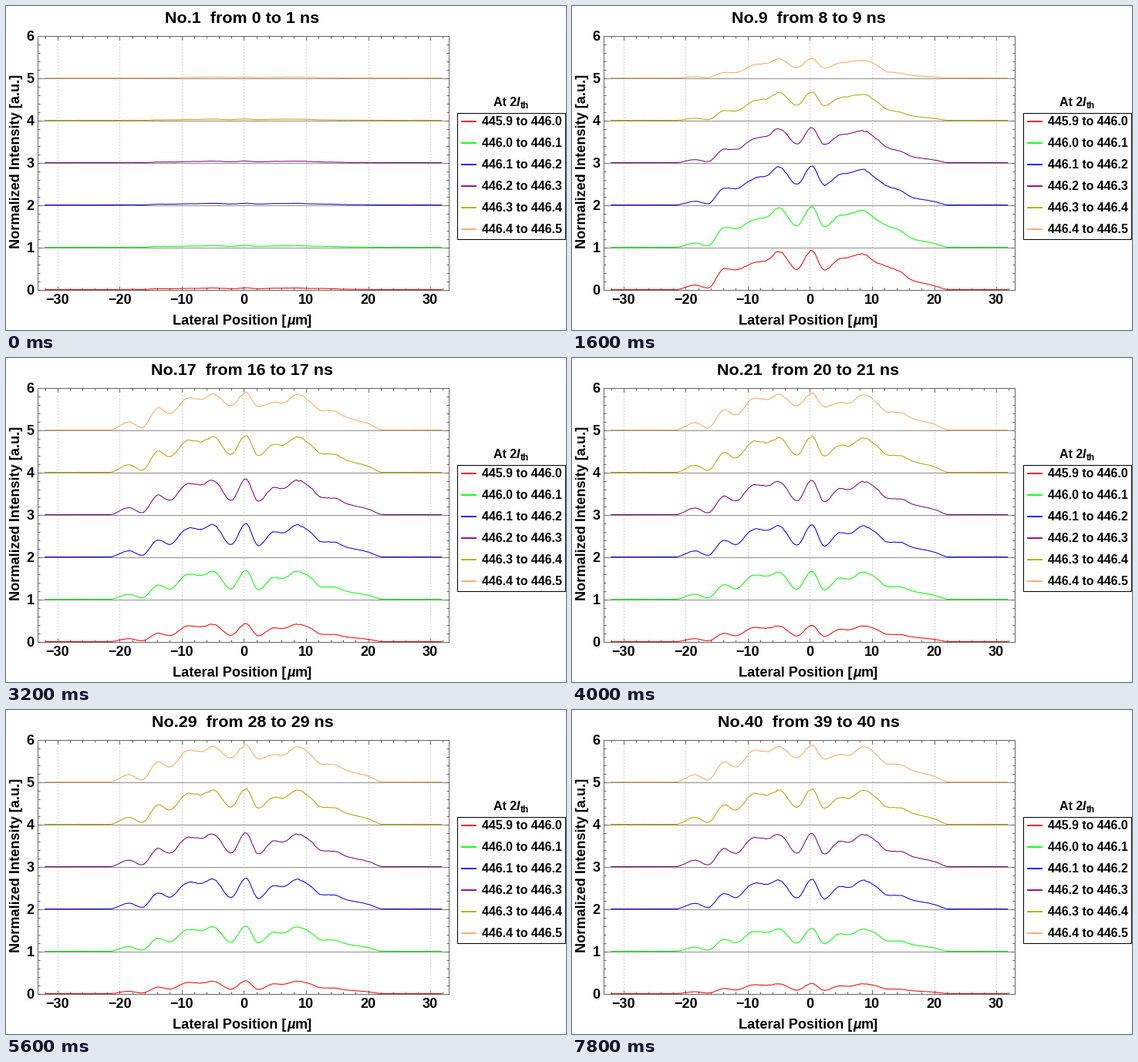
Animation, 726 px wide and 421 px high, one loop 8000 ms. Source, as a matplotlib script:

```python
import numpy as np
import matplotlib.pyplot as plt
from matplotlib.animation import FuncAnimation

W, H = 726, 421
LEFT, RIGHT, TOP, BOTTOM = 41.45, 574.45, 38.55, 368.55
X0, PX = 308.5, 8.055          # pixel of x = 0, pixels per micrometre
FRAMES, STEP = 40, 200

COLORS = ["#ff0000", "#00ff00", "#0000ff", "#800080", "#aaaa00", "#ffa858"]
BAND = np.arange(6)

# Peaks and dips of the beam profile: position, then relative height
# while switching on and in the steady state
KNOTS = np.array([-32, -21.6, -18.5, -16.4, -13.8, -12, -9, -7, -5, -2.1, 0.3,
                  2.3, 4.8, 6.3, 8.5, 10.5, 12.5, 14.5, 16.5, 20, 22.4, 32])
START = np.array([0, 0, .09, .03, .41, .39, .68, .74, .97, .52, 1,
                  .50, .78, .82, .91, .70, .45, .35, .18, .08, 0, 0])
STEADY = np.array([0, 0, .19, .05, .53, .38, .86, .82, .96, .35, 1,
                   .32, .75, .72, .96, .78, .46, .45, .30, .15, 0, 0])
EDGE = np.abs(KNOTS) > 11
DIP = np.isin(KNOTS, (-2.1, 2.3))

X = np.linspace(-32, 31.8, 170)
rng = np.random.default_rng(4)
RIPPLE = rng.normal(0, 0.011, (6, X.size))
FLOOR = rng.normal(0, 0.0015, (6, X.size))


def smooth(y):
    """Monotone cubic curve through the knots."""
    h = np.diff(KNOTS)
    d = np.diff(y) / h
    m = np.zeros_like(y)
    same = d[:-1] * d[1:] > 0
    a, b = d[:-1][same], d[1:][same]
    m[1:-1][same] = 2 * a * b / (a + b)
    i = np.clip(np.searchsorted(KNOTS, X, side="right") - 1, 0, len(h) - 1)
    t = (X - KNOTS[i]) / h[i]
    return (y[i] * (1 + 2 * t) * (1 - t) ** 2 + y[i + 1] * t * t * (3 - 2 * t)
            + h[i] * t * (1 - t) * (m[i] * (1 - t) - m[i + 1] * t))


def strength(n):
    """Peak height of each band: switch-on, drift to longer waves, settling."""
    drift = np.clip((n - 8) / 4, 0, 1)
    moving = 0.96 - 0.031 * (BAND - 1 - 2.6 * drift) ** 2
    if n <= 8:
        return moving * (0.045 + 0.955 * (n / 8) ** (0.8 + 0.3 * BAND))
    excess = 0.6 * np.exp(-BAND) * (min(39 - n, 19) / 19) ** 1.5
    steady = 0.9 * (1 - np.exp(-(BAND + 0.5) / 1.6)) * (1 + excess)
    ease = 1 - (1 - np.clip((n - 12) / 8, 0, 1)) ** 2
    return moving + (steady - moving) * ease


def curves(n):
    mix = np.clip((n - 8) / 4, 0, 1)
    tilt = np.interp(n, [8, 12, 20], [-0.12, 0.09, 0.02])
    for k, top in enumerate(strength(n)):
        shape = START + (STEADY - START) * mix
        shape = shape * (1 + EDGE * tilt * (k - 2.5)) + DIP * 0.3 * mix * (k / 5) ** 4
        yield k + np.maximum(top * smooth(shape) * (1 + RIPPLE[k]) + FLOOR[k], 0)


fig = plt.figure(figsize=(W / 100, H / 100), dpi=100, facecolor="white")


def text(x, y, s, px, **kw):
    opts = dict(family="Liberation Sans", weight="bold", va="baseline", color="black")
    opts.update(kw)
    return fig.text(x / W, 1 - y / H, s, size=px * 0.72, **opts)


ax = fig.add_axes([LEFT / W, 1 - BOTTOM / H, (RIGHT - LEFT) / W, (BOTTOM - TOP) / H])
ax.set_xlim((LEFT - X0) / PX, (RIGHT - X0) / PX)
ax.set_ylim(0, 6)
ax.set_xticks(range(-30, 31, 10))
ax.set_xticks(range(-32, 33, 2), minor=True)
ax.set_yticks(range(7))
ax.set_yticks(np.arange(0, 6.01, 0.2), minor=True)
for which, size in (("major", 3.6), ("minor", 2.1)):
    ax.tick_params(which=which, direction="in", length=size, width=0.72, color="#666666",
                   top=True, right=True, labelbottom=False, labelleft=False)
for spine in ax.spines.values():
    spine.set(color="#666666", linewidth=0.72)

for x in range(-30, 31, 10):
    ax.axvline(x, color="#a0a0a0", lw=0.72, ls=(0, (1, 3)), zorder=0.5)
    text(X0 + x * PX, 387, str(x).replace("-", "\u2212"), 18, ha="center")
for y in range(7):
    if 0 < y < 6:
        ax.axhline(y, color="#8c8c8c", lw=0.72, zorder=1)
    text(36.8, BOTTOM - 55 * y + 6, str(y), 18, ha="right")

title = text(306.5, 22, "", 21.5, ha="center")
text(216.3, 414, "Lateral Position [", 18.2)
text(364, 414, "\u00b5", 18.2, style="italic")
text(375, 414, "m]", 18.2)
text(18, 202, "Normalized Intensity [a.u.]", 18.2, rotation=90,
     rotation_mode="anchor", ha="center")

# Legend
text(631.5, 130, "At 2", 16)
text(662, 130, "I", 16, style="italic")
text(667, 133, "th", 11.8)
fig.add_artist(plt.Rectangle((585.45 / W, 1 - 302.55 / H), 140 / W, 164 / H,
                             fill=False, ec="black", lw=0.72))
for k, color in enumerate(COLORS):
    y = 150 + 28 * k
    fig.add_artist(plt.Line2D([591 / W, 609 / W], [1 - y / H] * 2, color=color, lw=1.3))
    text(616.8, y + 5, f"{445.9 + k / 10:.1f} to {446 + k / 10:.1f}", 15.9)

lines = [ax.plot([], [], color=c, lw=0.75, clip_on=False, zorder=3)[0] for c in COLORS]


def draw(n):
    title.set_text(f"No.{n + 1}  from {n} to {n + 1} ns")
    for line, y in zip(lines, curves(n)):
        line.set_data(X, y)
    return [title, *lines]


anim = FuncAnimation(fig, draw, frames=FRAMES, interval=STEP, repeat=True, repeat_delay=0)
plt.show()
```
